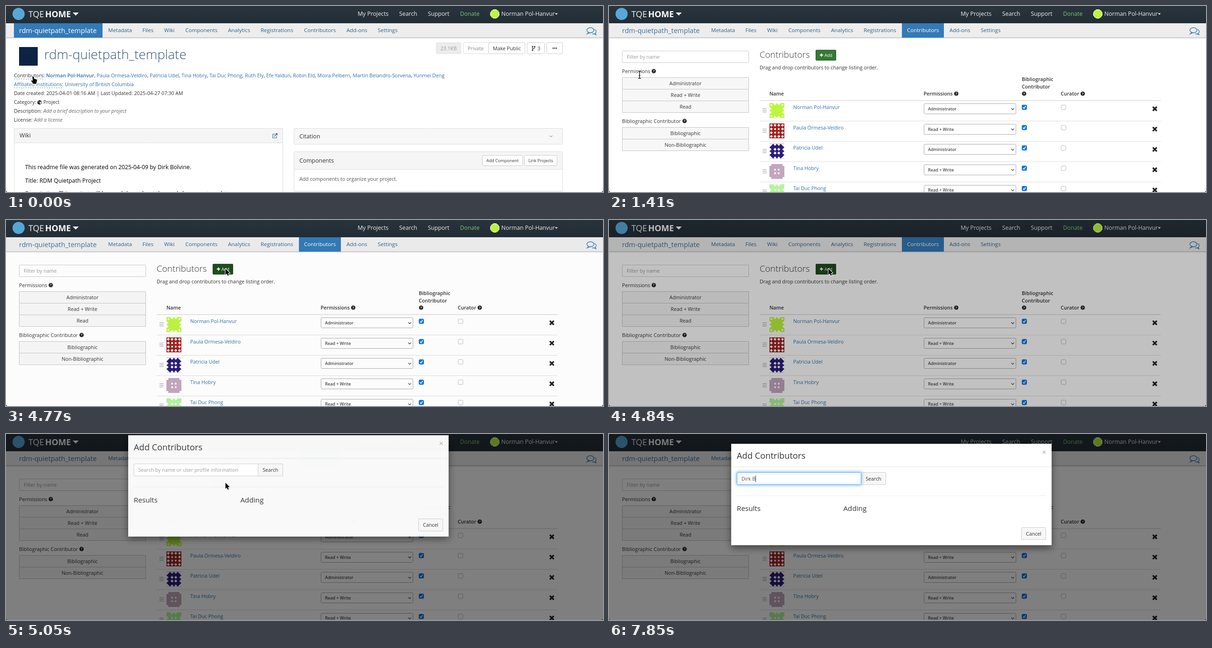
An HTML page with a canvas that plays this animation: 1280 px wide and 399 px high, repeating every 8 s.

```html
<!DOCTYPE html>
<html lang="en">
<head>
<meta charset="utf-8">
<title>Add contributors</title>
<style>
html, body { margin: 0; width: 100%; height: 100%; overflow: hidden; background: #fff; }
canvas { display: block; width: 100vw; height: 100vh; }
</style>
</head>
<body>
<canvas id="stage" width="1280" height="399"></canvas>
<script>
const c = document.getElementById('stage').getContext('2d');
const LOOP = 8000, STEP = 70, FIRST = 500;
const BODY = 10.7, SMALL = 9.05, NAV = 11.5, HEAD = 12.3;
const INK = '#333', BLUE = '#337ab7', LINK = '#3071a9', NAVY = '#2f618c', MUTED = '#999', EDGE = '#ccc';
const TITLE = 'rdm-quietpath_template', OWNER = 'Norman Pol-Hanvur';

const clamp = v => Math.max(0, Math.min(1, v));
const mix = (a, b, k) => a + (b - a) * k;
const smooth = k => k * k * (3 - 2 * k);

// y is the middle of the capital letters; returns the advance
function text(s, x, y, size = BODY, color = INK, o = {}) {
  c.font = `${o.italic ? 'italic ' : ''}${o.weight || 400} ${size}px "Open Sans", sans-serif`;
  c.textAlign = o.align || 'left';
  c.fillStyle = color;
  c.fillText(s, x, y + size * 0.36);
  return c.measureText(s).width;
}
const mid = (s, x, y, size, color) => text(s, x, y, size, color, { align: 'center' });

function rect(x, y, w, h, fill) {
  c.fillStyle = fill;
  c.fillRect(x, y, w, h);
}
function box(x, y, w, h, fill, edge = EDGE, r = 1) {
  c.beginPath();
  c.roundRect(x + 0.5, y + 0.5, w - 1, h - 1, r);
  c.fillStyle = fill;
  c.fill();
  c.strokeStyle = edge;
  c.lineWidth = 1;
  c.stroke();
}
function line(pts, color, width = 1) {
  c.beginPath();
  pts.forEach(p => c.lineTo(...p));
  c.strokeStyle = color;
  c.lineWidth = width;
  c.stroke();
}
function poly(pts, fill) {
  c.beginPath();
  pts.forEach(p => c.lineTo(...p));
  c.closePath();
  c.fillStyle = fill;
  c.fill();
}
function disc(x, y, r, fill) {
  c.beginPath();
  c.arc(x, y, r, 0, 7);
  c.fillStyle = fill;
  c.fill();
}
function help(x, y) {
  disc(x, y, 4.6, '#222');
  text('?', x, y, 7.5, '#fff', { weight: 700, align: 'center' });
}
const chevron = (x, y, color, w) => line([[x - 3, y - 1.5], [x, y + 1.5], [x + 3, y - 1.5]], color, w);
function dashes(x1, x2, y) {
  c.setLineDash([3, 2]);
  line([[x1, y], [x2, y]], '#6f9fc9');
  c.setLineDash([]);
}

// what is cut out of a filled unit tile
const CUTS = {
  full: [],
  hole: [[0.3, 0.3], [0.75, 0.3], [0.75, 0.75], [0.3, 0.75]],
  diamond: [[0.5, 0.1], [0.9, 0.5], [0.5, 0.9], [0.1, 0.5]],
  corner: [[0, 0], [0.5, 0], [0.5, 0.5], [0, 0.5]],
  vee: [[0, 0], [1, 0], [0.5, 0.6]],
  half: [[0, 0], [1, 0], [0, 1]]
};
// 4 x 4 tiles, one quarter turned about the middle
function identicon(x, y, size, color, [corner, side, inner]) {
  c.save();
  c.translate(x + size / 2, y + size / 2);
  c.scale(size / 4, size / 4);
  for (let k = 0; k < 4; k++) {
    rect(-2, -2, 2.02, 2.02, color);
    for (const [cut, i, j] of [[corner, -2, -2], [side, -1, -2], [side, -2, -1], [inner, -1, -1]])
      poly(CUTS[cut].map(([u, v]) => j < i ? [i + u, j + v] : [i + v, j + u]), '#fff');
    c.rotate(Math.PI / 2);
  }
  c.restore();
}

const TABS = [['Metadata', 219], ['Files', 292.5], ['Wiki', 339], ['Components', 384.5], ['Analytics', 476],
  ['Registrations', 546], ['Contributors', 639], ['Add-ons', 730], ['Settings', 797]];

function header(onHome) {
  const g = c.createLinearGradient(0, 0, 0, 37);
  g.addColorStop(0, '#29343d');
  g.addColorStop(1, '#222d35');
  rect(0, 0, 1280, 37, g);
  disc(27, 17, 13, '#57a8d8');
  text('TQE', 48, 17.5, 18, '#f4f4f4');
  text('HOME', 84, 17.5, 18, '#fff', { weight: 700 });
  poly([[143, 14], [156, 14], [149.5, 20.5]], '#fff');
  text('My Projects', 754, 17, HEAD, '#f2f2f2');
  text('Search', 843, 17, HEAD, '#f2f2f2');
  text('Support', 904.5, 17, HEAD, '#f2f2f2');
  text('Donate', 973.5, 17, HEAD, '#7cc576');
  c.save();
  c.beginPath();
  c.arc(1048, 17, 10, 0, 7);
  c.clip();
  identicon(1038, 7, 20, ROWS[0][2], ROWS[0][3]);
  c.restore();
  text(OWNER, 1062, 17, HEAD, '#f2f2f2');
  poly([[1177, 15.5], [1183, 15.5], [1180, 19]], '#f2f2f2');

  rect(0, 37, 1280, 31, '#ededed');
  const s = c.createLinearGradient(0, 67, 0, 71);
  s.addColorStop(0, 'rgba(0,0,0,.2)');
  s.addColorStop(1, 'rgba(0,0,0,0)');
  rect(0, 67, 1280, 4, s);
  if (onHome) rect(17, 37, 190, 31, BLUE);
  else rect(628, 37, 90, 31, BLUE);
  text(TITLE, 28, 52.5, 14.6, onHome ? '#fff' : '#3f709a');
  for (const [s, x] of TABS) text(s, x, 52, NAV, !onHome && s === 'Contributors' ? '#fff' : NAVY);

  c.strokeStyle = BLUE;
  c.lineWidth = 1.3;
  c.beginPath();
  c.ellipse(1259, 55, 6.5, 5, 0, -1.2, 1.9);
  c.stroke();
  line([[1261, 60], [1265, 62], [1263.5, 58]], BLUE, 1.3);
  c.beginPath();
  c.ellipse(1253, 52, 7.5, 5.5, 0, 0, 7);
  c.fillStyle = '#ededed';
  c.fill();
  c.stroke();
  line([[1249, 57], [1246, 60], [1252, 57.5]], BLUE, 1.3);
}

const PEOPLE = ['Paula Ormesa-Veldiro', 'Patricia Udel', 'Tina Hobry', 'Tai Duc Phong', 'Ruth Ely', 'Efe Yaldun',
  'Robin Eld', 'Moira Pelbern', 'Martin Belandro-Sorvena', 'Yunmei Deng'];

function homePage() {
  rect(28, 88, 40, 40, '#0c2344');
  text(TITLE, 82, 103.5, 27.9, '#35567a', { weight: 300 });

  box(922, 78, 54, 25, '#ececec', '#e4e4e4', 2);
  mid('23.1KB', 949, 91, BODY, MUTED);
  box(980, 78, 55, 25, '#fff', '#ddd', 2);
  mid('Private', 1007, 91, BODY, '#888');
  box(1034, 78, 79, 25, '#fff', EDGE, 2);
  mid('Make Public', 1074, 91);
  box(1117, 78, 38, 25, '#fff', EDGE, 2);
  line([[1129, 87], [1129, 95]], INK, 1.2);
  line([[1133.5, 87], [1133.5, 90], [1129, 92.5]], INK, 1.2);
  [[1129, 87], [1129, 95], [1133.5, 87]].forEach(p => disc(...p, 1.5, INK));
  text('3', 1139.5, 91);
  box(1159, 78, 35, 25, '#fff', EDGE, 2);
  [1173, 1176.5, 1180].forEach(x => disc(x, 90.5, 1.3, '#222'));

  text('Contributors:', 17, 149.5);
  dashes(17, 83, 156.5);
  let x = 86 + text(OWNER, 86, 149.5, BODY, LINK, { weight: 600 });
  for (const name of PEOPLE) {
    x += text(', ', x, 149.5);
    x += text(name, x, 149.5, BODY, LINK);
  }
  text('Affiliated Institutions:', 17, 168.5, BODY, LINK);
  dashes(17, 122, 175.5);
  text('University of British Columbia', 126, 168.5, BODY, LINK);
  text('Date created: 2025-04-01 08:16 AM | Last Updated: 2025-04-27 07:30 AM', 17, 187.5);
  text('Category:', 17, 206.5);
  poly([[72, 202], [76.5, 204], [76.5, 209.5], [72, 211.8], [67.5, 209.5], [67.5, 204]], '#222');
  poly([[72.6, 207.2], [75.6, 205.6], [75.6, 208.8], [72.6, 210.4]], '#fff');
  line([[68.5, 204.8], [72, 206.5], [75.5, 204.8]], '#fff', 0.8);
  text('Project', 80, 206.5);
  text('Description:', 17, 225.5);
  text('Add a brief description to your project', 80, 225.5, BODY, '#666', { italic: true });
  text('License:', 17, 244.5);
  text('Add a license', 60, 244.5, BODY, '#666', { italic: true });

  box(17, 262, 577, 150, '#fff', '#ddd');
  box(17, 262, 577, 32, '#f5f5f5', '#ddd');
  text('Wiki', 29, 277.5, HEAD);
  line([[577, 275], [572, 275], [572, 283], [580, 283], [580, 279]], LINK, 1.2);
  line([[575, 280], [581, 274]], LINK, 1.4);
  poly([[577, 273], [582, 273], [582, 278]], LINK);
  text('This readme file was generated on 2025-04-09 by Dirk Bolvine.', 41, 346, HEAD, '#000');
  text('Title: RDM Quietpath Project', 41, 374.5, HEAD, '#000');
  text('Description: This project will be used throughout the workshop as a template.', 41, 403, HEAD, '#000');

  box(617, 262, 577, 35, '#f7f7f7', '#ddd');
  text('Citation', 629, 280, HEAD);
  chevron(1168.5, 279.5, LINK, 1);
  box(617, 312, 577, 86, '#fff', '#ddd');
  box(617, 312, 577, 39, '#f5f5f5', '#ddd');
  text('Components', 629, 331.5, HEAD);
  box(1021, 320, 87, 23, '#fff', EDGE, 2);
  mid('Add Component', 1064.5, 332, SMALL);
  box(1111, 320, 71, 23, '#fff', EDGE, 2);
  mid('Link Projects', 1146.5, 332, SMALL);
  text('Add components to organize your project.', 629, 371.5, BODY, '#555');
}

const ROWS = [
  [OWNER, 1, '#bdf53d', ['hole', 'vee', 'full']],
  [PEOPLE[0], 0, '#a3201c', ['diamond', 'diamond', 'hole']],
  [PEOPLE[1], 1, '#2a1c78', ['half', 'vee', 'diamond']],
  [PEOPLE[2], 0, '#c3a6bf', ['corner', 'full', 'hole']],
  [PEOPLE[3], 0, '#b2f49c', ['full', 'vee', 'hole']]
];

function row([name, admin, color, tiles], i) {
  const y = 217.3 + 43.55 * i;
  [3, 6.5, 10].forEach(d => rect(329, y + d - 0.5, 9, 1.2, '#aaa'));
  identicon(344, y - 9, 32, color, tiles);
  text(name, 395, y, BODY, LINK);
  box(675, Math.round(y - 8), 198, 23, '#fff', '#aaa', 2);
  text(admin ? 'Administrator' : 'Read + Write', 684, y + 3.6, SMALL, '#444', { weight: 600 });
  chevron(865.5, y + 3.7, '#444', 1.3);
  box(885, y - 5.5, 11, 11, '#0b75e0', '#0b75e0', 2);
  line([[887.7, y], [889.8, y + 2.5], [893.3, y - 2.8]], '#fff', 1.6);
  box(969, y - 5.5, 11, 11, '#fff', '#bbb', 2);
  line([[1166, y - 1], [1174.5, y + 7.5]], '#222', 3.4);
  line([[1174.5, y - 1], [1166, y + 7.5]], '#222', 3.4);
  rect(323, y + 29, 860, 1, '#ddd');
}

function group(names, y) {
  names.forEach((s, i) => {
    box(28, y + i * 25, 272, 26, '#f7f7f7', '#c4c4c4', 0);
    mid(s, 164, y + 13 + i * 25);
  });
}

function listPage(green, full) {
  box(28, 96, 272, 26, '#fff', EDGE);
  text('Filter by name', 38, 109.5, BODY, MUTED);
  text('Permissions', 28, 140);
  help(96, 139.7);
  group(['Administrator', 'Read + Write', 'Read'], 153);
  text('Bibliographic Contributor', 28, 247);
  help(162, 246.7);
  group(['Bibliographic', 'Non-Bibliographic'], 260);

  text('Contributors', 323, 104, 18.86, INK, { weight: 300 });
  box(443, 94, 44, 23, green, '#23511f');
  rect(452, 104.2, 7, 2, '#fff');
  rect(454.5, 101.7, 2, 7, '#fff');
  text('Add', 462, 105.4, SMALL, '#fff');
  text('Drag and drop contributors to change listing order.', 323, 132.5);
  if (!full) return;

  const bold = { weight: 600 };
  text('Name', 344, 188, BODY, INK, bold);
  text('Permissions', 674.5, 188, BODY, INK, bold);
  help(744.5, 188);
  text('Bibliographic', 885, 157.5, BODY, INK, bold);
  text('Contributor', 885, 173, BODY, INK, bold);
  help(890, 188);
  text('Curator', 968.5, 188, BODY, INK, bold);
  help(1015.7, 188);
  rect(323, 202, 860, 1.6, '#ddd');
  ROWS.forEach(row);
}

function modal(alpha, shift, focus, typed) {
  c.save();
  c.globalAlpha = alpha;
  c.translate(0, shift);
  c.save();
  c.shadowColor = 'rgba(0,0,0,.5)';
  c.shadowBlur = 15;
  c.shadowOffsetY = 5;
  rect(262, 21, 687, 217.5, '#fff');
  c.restore();
  text('Add Contributors', 274, 46.5, 18.3);
  mid('×', 933, 39, 16, '#aaa');
  rect(262, 70, 687, 1, '#e5e5e5');
  box(540, 82, 54, 27, '#f7f7f7', EDGE);
  mid('Search', 567, 96);
  c.save();
  if (focus) {
    c.shadowColor = `rgba(102,175,233,${focus})`;
    c.shadowBlur = 7;
  }
  box(274, 82, 267, 27, '#fff', focus > 0.3 ? '#66afe9' : EDGE);
  c.restore();
  let caret = 284;
  if (typed) caret += text(typed, 284, 96, BODY, '#555');
  else text('Search by name or user profile information', 283.5, 96, BODY, MUTED);
  if (focus) rect(Math.round(caret), 89, 1, 14, '#333');
  rect(274, 132, 663, 1, '#eee');
  text('Results', 274, 160, 15.2);
  text('Adding', 502.5, 160, 15.2);
  box(884, 200, 53, 27, '#f7f7f7', EDGE);
  mid('Cancel', 910.5, 214);
  c.restore();
}

function outlined(pts) {
  c.beginPath();
  pts.forEach(p => c.lineTo(...p));
  c.closePath();
  c.lineJoin = 'round';
  c.strokeStyle = '#fff';
  c.lineWidth = 2;
  c.stroke();
  c.fillStyle = '#000';
  c.fill();
  c.lineJoin = 'miter';
}
const POINTERS = {
  arrow: () => outlined([[0, 0], [0, 13], [3, 10.4], [5, 15], [7.2, 14], [5.2, 9.6], [9.2, 9.3]]),
  hand: () => outlined([[-3, -6], [-1.5, -7], [0, -6], [0.8, -1.5], [3, -2], [4, -0.8], [6, -0.5], [7, 1.5],
    [6.2, 5.5], [5, 9], [-1, 9], [-3.5, 5.5], [-5.5, 2.5], [-4.5, 1.2], [-2, 2.8]]),
  beam() {
    for (const [color, w] of [['#fff', 2.6], ['#000', 1.3]]) {
      line([[0, -7], [0, 7]], color, w);
      line([[-3, -8], [-1, -7.7], [0, -6.5], [1, -7.7], [3, -8]], color, w);
      line([[-3, 8], [-1, 7.7], [0, 6.5], [1, 7.7], [3, 8]], color, w);
      line([[-2, 1.5], [2, 1.5]], color, w * 0.8);
    }
  }
};

// [start, end, x0, y0, x1, y1]
const MOVES = [[1410, 1830, 65.5, 147.5, 266, 133], [2040, 2320, 266, 133, 406, 170],
  [2600, 3300, 406, 170, 470.5, 104.5], [5540, 5820, 470.5, 105.5, 446.5, 95.5]];

function pointer(t) {
  if (t < 1410) return ['hand', 59.5, 158];
  const [a, b, x0, y0, x1, y1] = MOVES.filter(m => t >= m[0]).pop();
  const k = smooth(clamp((t - a) / (b - a)));
  const x = mix(x0, x1, k), y = mix(y0, y1, k);
  const overText = t === 1410 || t >= 5190 || (x > 323 && y > 124 && y < 141);
  return [overText ? 'beam' : 'arrow', x, y];
}

const KEYS = [[6870, 'D'], [7150, 'Di'], [7220, 'Dir'], [7360, 'Dirk'], [7500, 'Dirk '], [7850, 'Dirk B']];

function draw(now) {
  const raw = now % LOOP;
  const t = raw < FIRST ? 0 : FIRST + Math.floor((raw - FIRST) / STEP) * STEP;
  const [shape, px, py] = pointer(t);
  rect(0, 0, 1280, 399, '#fff');
  header(t < FIRST);
  if (t < FIRST) homePage();
  else if (t >= 570) {
    const hover = px > 443 && px < 487 && py > 94 && py < 117;
    listPage(t >= 4770 ? '#1f4d1f' : hover ? '#285c27' : '#357935', t >= 640);
  }

  if (t >= 4770) rect(0, 0, 1280, 399, `rgba(0,0,0,${0.5 * clamp((t - 4767) / 150)})`);
  if (t >= 4910) {
    const k = (t - 4905) / 300;
    const typed = KEYS.filter(e => t >= e[0]).pop();
    modal(clamp(2 * k), -53 * (1 - clamp(k)) ** 1.6, clamp((t - 6170) / 210), typed ? typed[1] : '');
  }

  if (t < 6800) {
    c.save();
    c.translate(px, py);
    POINTERS[shape]();
    c.restore();
  }
  poly([[0, 396], [1, 398], [3, 399], [0, 399]], '#222');
  poly([[1280, 396], [1279, 398], [1277, 399], [1280, 399]], '#222');
}

const start = performance.now();
function tick() {
  draw(performance.now() - start);
  requestAnimationFrame(tick);
}
tick();
</script>
</body>
</html>
```
